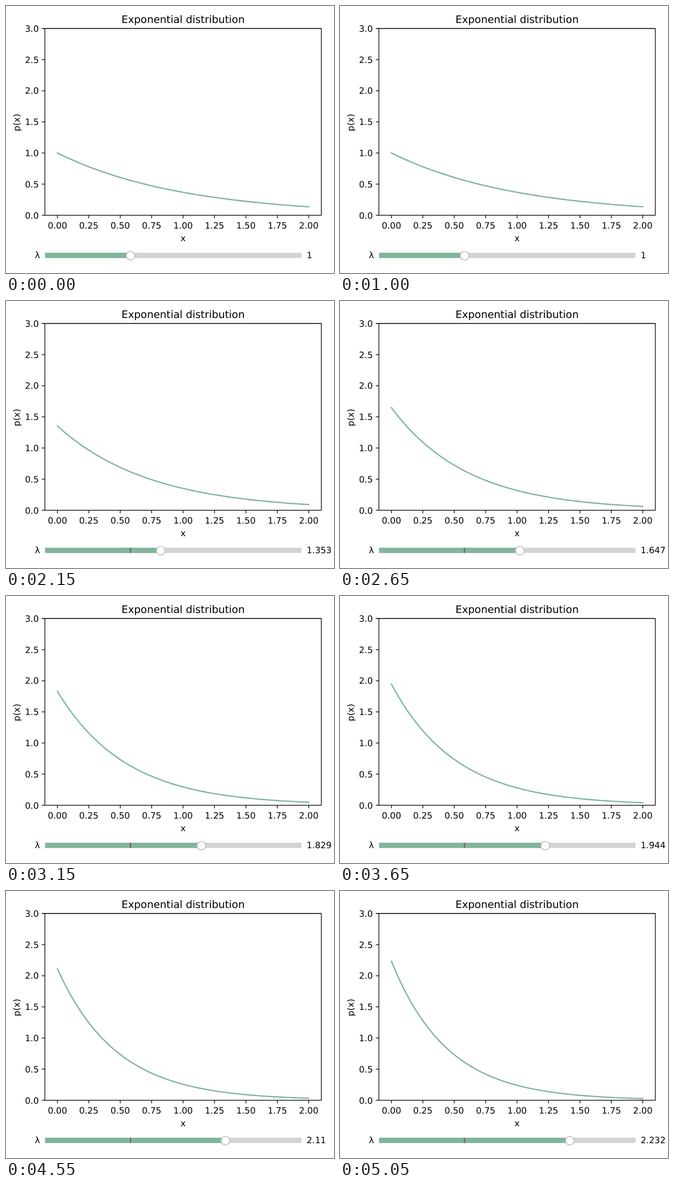
Recreate the animation shown at these times as an HTML page. Size 600x487 px, loop 6250 ms.

```html
<!DOCTYPE html>
<html lang="en">
<head>
<meta charset="utf-8">
<title>Exponential distribution</title>
<style>
  html, body { margin: 0; width: 100%; height: 100%; overflow: hidden; background: #fff; }
  svg { display: block; font: 15.9px "DejaVu Sans", sans-serif; text-rendering: geometricPrecision; }
</style>
</head>
<body>
<svg id="plot" width="600" height="487" viewBox="0 0 600 487"></svg>
<script>
const LOOP = 6250, GREEN = "#80b59b";
const LEFT = 71.1, RIGHT = 576.8, TOP = 41, BOTTOM = 381.6;
const TRACK_X = 71.5, TRACK_W = 469, TRACK_Y = 450, TRACK_H = 9.6;

// Key points of the drag: [time in ms, lambda]
const drag = [
  [1000, 1], [1350, 1.019], [1550, 1.057], [1800, 1.178], [2000, 1.326],
  [2150, 1.353], [2250, 1.385], [2650, 1.685], [3000, 1.807], [3150, 1.829],
  [3450, 1.861], [3600, 1.944], [3800, 2.008], [4550, 2.11], [5000, 2.232]
];

// The picture refreshes in an uneven beat that repeats every 600 ms
const BEAT = 600, beats = [0, 50, 200, 300, 450];
function lastRefresh(t) {
  const phase = (t + 450) % BEAT;
  return t - phase + beats.findLast(b => b <= phase);
}

function lambdaAt(t) {
  const i = drag.findIndex(key => key[0] > t);
  if (i < 0) return drag.at(-1)[1];
  if (i === 0) return drag[0][1];
  const [t0, v0] = drag[i - 1], [t1, v1] = drag[i];
  return v0 + (v1 - v0) * (t - t0) / (t1 - t0);
}

const plot = document.getElementById("plot");
const px = x => LEFT + (x + 0.1) / 2.2 * (RIGHT - LEFT);
const py = y => BOTTOM - y / 3 * (BOTTOM - TOP);
const sx = v => TRACK_X + v / 3 * TRACK_W;

function add(tag, attrs, text = "") {
  const el = document.createElementNS("http://www.w3.org/2000/svg", tag);
  for (const k in attrs) el.setAttribute(k, attrs[k]);
  el.textContent = text;
  plot.append(el);
  return el;
}
const label = (text, x, y, anchor = "middle", more = {}) =>
  add("text", { x, y, "text-anchor": anchor, ...more }, text);
const bar = (fill, x = TRACK_X, width = TRACK_W) =>
  add("rect", { x, y: TRACK_Y, width, height: TRACK_H, fill });

// Axes
const curve = add("path", { fill: "none", stroke: GREEN, "stroke-width": 2.38, "stroke-linecap": "square", "stroke-linejoin": "round" });
let frame = `M${LEFT} ${TOP}H${RIGHT}V${BOTTOM}H${LEFT}Z`;
for (let x = 0; x <= 2; x += 0.25) {
  frame += `M${px(x)} ${BOTTOM}v5.6`;
  label(x.toFixed(2), px(x), 406.3);
}
for (let y = 0; y <= 3; y += 0.5) {
  frame += `M${LEFT} ${py(y)}h-5.6`;
  label(y.toFixed(1), 60, py(y) + 5.9, "end");
}
add("path", { d: frame, fill: "none", stroke: "#000", "stroke-width": 1.27 });
label("Exponential distribution", px(1), 31.2, "middle", { "font-size": 18.9 });
label("x", px(1), 428.5);
label("p(x)", 0, 0, "middle", { transform: "translate(25 212.5) rotate(-90)" });

// Slider
bar("#d3d3d3");
const fill = bar(GREEN);
bar("#85505c", sx(1) - 1.2, 2);
const knob = add("circle", { cy: 455.4, r: 7.9, fill: "#fff", stroke: "#bfbfbf", "stroke-width": 1.59 });
label("λ", 62.2, 460, "end");
const value = label("", 550, 460, "start");

function show(v) {
  let d = "";
  for (let i = 0; i <= 100; i++) {
    const x = i / 50;
    d += (i ? "L" : "M") + px(x).toFixed(2) + " " + py(v * Math.exp(-v * x)).toFixed(2);
  }
  curve.setAttribute("d", d);
  fill.setAttribute("width", sx(v) - TRACK_X);
  knob.setAttribute("cx", sx(v));
  value.textContent = +v.toPrecision(4);
}

const start = performance.now();
function tick() {
  const t = (performance.now() - start) % LOOP;
  show(lambdaAt(lastRefresh(t)));
  requestAnimationFrame(tick);
}
tick();
</script>
</body>
</html>
```
